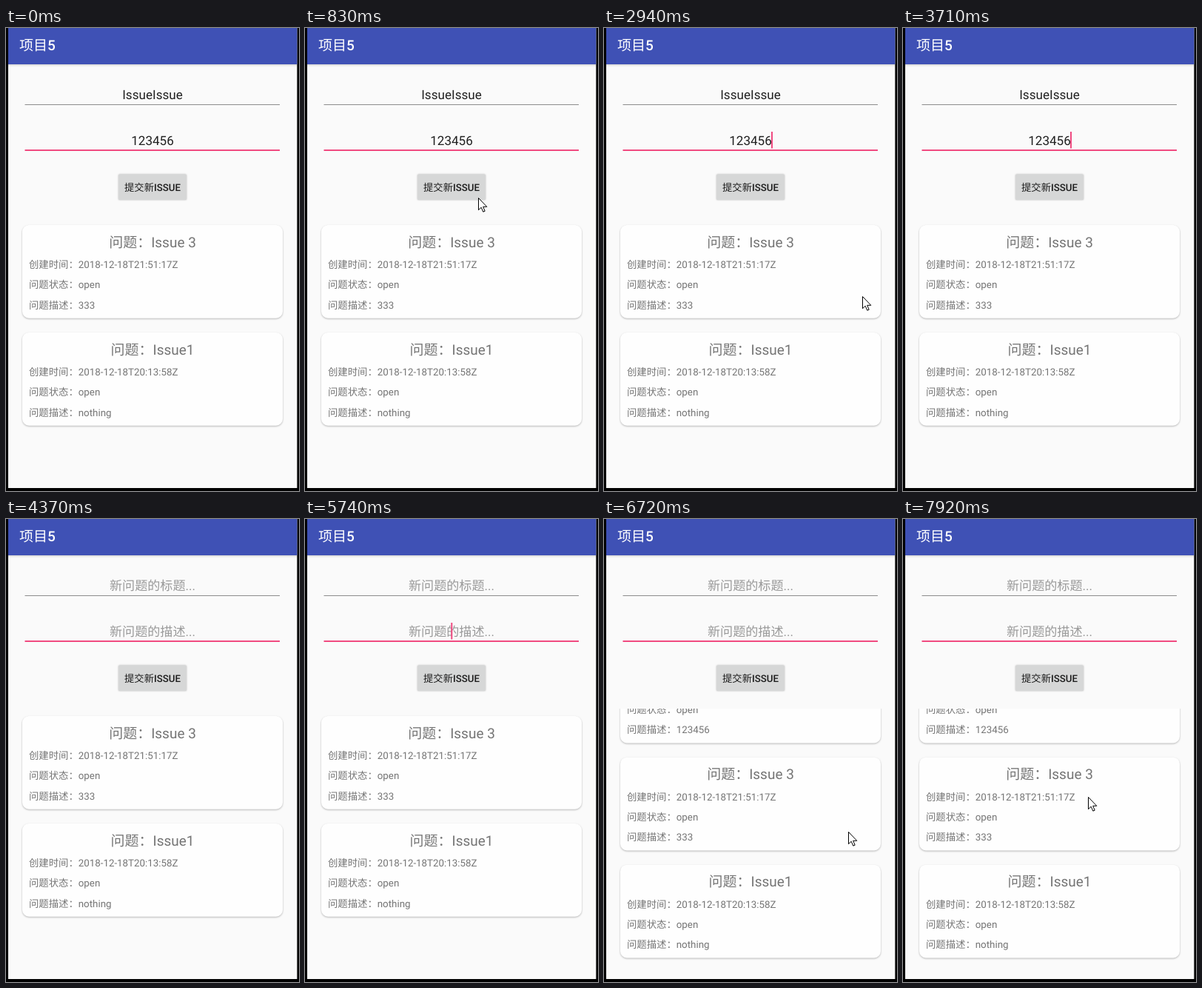
These frames come from a looping animation (396x625 px, 7990 ms). An HTML page:

```html
<!DOCTYPE html>
<html lang="zh-CN">
<head>
<meta charset="utf-8">
<title>项目5</title>
<style>
  html, body { margin: 0; width: 100%; height: 100%; overflow: hidden; background: #000; }
  svg { display: block; }
  text {
    font-family: Roboto, "Noto Sans CJK SC", "Noto Sans CJK", sans-serif;
    text-rendering: geometricPrecision;
  }
  .mid { text-anchor: middle; }
  .medium { font-weight: 500; }
  .field { font-size: 17.1px; fill: #212121; }
  .hint { fill: #999; }
  .accent { fill: #f04a80; }
  .card { fill: #757575; font-size: 13.35px; }
  .card .title { font-size: 19px; }
  .card rect { fill: #fefefe; filter: drop-shadow(0 1px 1.1px rgba(0, 0, 0, .27)); }
  .bar { fill: #3f51b5; filter: drop-shadow(0 1px 1.5px rgba(0, 0, 0, .2)); }
  #button { filter: drop-shadow(0 .5px .8px rgba(0, 0, 0, .25)); }
</style>
</head>
<body>
<svg width="396" height="625" viewBox="0 0 396 625">
  <defs>
    <clipPath id="screen"><rect x="3" width="390.4" height="621"/></clipPath>
    <clipPath id="listArea"><rect x="3" y="256" width="390" height="365"/></clipPath>
  </defs>
  <g clip-path="url(#screen)">
    <rect width="396" height="621" fill="#fafafa"/>
    <rect class="bar" x="-5" y="-5" width="406" height="54"/>
    <text x="18" y="30.3" font-size="19" fill="#fff">项目<tspan class="medium">5</tspan></text>

    <text id="name" class="field mid" x="198" y="96"></text>
    <rect x="25.5" y="103" width="344.5" height="1" fill="#8c8c8c"/>
    <text id="detail" class="field mid" x="198" y="158"></text>
    <rect class="accent" x="25.5" y="164" width="344.5" height="2"/>
    <rect id="caret" class="accent" y="140" width="2" height="22.5"/>

    <rect id="button" x="152" y="197.5" width="92" height="34.5" rx="1.5"/>
    <text class="mid" x="198" y="220" font-size="13.3" fill="#1c1c1c">提交新<tspan class="medium">ISSUE</tspan></text>

    <g clip-path="url(#listArea)">
      <g id="newCard"></g>
      <g id="oldCards"></g>
    </g>
  </g>
  <path id="pointer" d="M.5 .5V16.7L4.2 13.2L6.8 19.2L9.2 18.2L6.7 12.3H11.8Z"
        fill="#fff" stroke="#000"/>
</svg>
<script>
const LOOP = 7990;
const BLINK = 205;
const CARD_TOP = 266;
const CARD_PITCH = 145;
const LIST_SHIFT = 55.7;

// The caret blinks for a while, then stays lit until it is hidden.
const caretBursts = [
  { start: 30, blinks: 10, end: 4370 },
  { start: 4410, blinks: 12, end: 7920 }
];

// Waypoints of each pointer visit; power shapes the approach (below 1 slows down, above 1 speeds up).
const pointerVisits = [
  { end: 3710, path: [
    { at: 130, x: 346, y: 596 },
    { at: 730, x: 245, y: 234, power: .7 },
    { at: 1720, x: 211, y: 217, power: .5 },
    { at: 2080, x: 210, y: 212, power: 1 },
    { at: 2940, x: 348, y: 361, power: 2 },
    { at: 3710, x: 392, y: 405, power: .6 }
  ] },
  { end: LOOP, path: [
    { at: 6320, x: 390, y: 465 },
    { at: 6720, x: 330, y: 422, power: 1 },
    { at: 7120, x: 281, y: 364, power: .8 },
    { at: 7880, x: 250, y: 375, power: 1 }
  ] }
];

const $ = id => document.getElementById(id);
const progress = (t, from, to) => Math.min(1, Math.max(0, (t - from) / (to - from)));
const smooth = p => p * p * (3 - 2 * p);
const mix = (a, b, p) => Math.round(a + (b - a) * p);
const within = (t, from, to) => t >= from && t < to;

function cardMarkup(top, title, created, detail) {
  const lines = ['创建时间：' + created, '问题状态：open', '问题描述：' + detail];
  return `<g class="card" transform="translate(0 ${top})">
    <rect x="22" width="352" height="125.7" rx="9"/>
    <text class="title mid" x="198" y="29.5">问题：${title}</text>
    ${lines.map((line, i) => `<text x="31" y="${58 + i * 27.3}">${line}</text>`).join('')}
  </g>`;
}

$('newCard').innerHTML =
  cardMarkup(CARD_TOP + LIST_SHIFT - CARD_PITCH, 'IssueIssue', '2018-12-18T21:53:40Z', '123456');
$('oldCards').innerHTML =
  cardMarkup(CARD_TOP, 'Issue 3', '2018-12-18T21:51:17Z', '333') +
  cardMarkup(CARD_TOP + CARD_PITCH, 'Issue1', '2018-12-18T20:13:58Z', 'nothing');

function caretVisible(t) {
  const burst = caretBursts.find(({ start, end }) => within(t, start, end));
  if (!burst) return false;
  const flips = Math.floor((t - burst.start) / BLINK);
  return Math.min(flips, burst.blinks) % 2 === 0;
}

function pointerAt(t) {
  const visit = pointerVisits.find(({ path, end }) => within(t, path[0].at, end));
  if (!visit) return null;
  const { path } = visit;
  const next = path.findIndex(point => point.at > t);
  if (next < 0) return path.at(-1);
  const a = path[next - 1];
  const b = path[next];
  const p = progress(t, a.at, b.at) ** b.power;
  return { x: mix(a.x, b.x, p), y: mix(a.y, b.y, p) };
}

function setField(id, value, hint, cleared) {
  const field = $(id);
  field.textContent = cleared ? hint : value;
  field.classList.toggle('hint', cleared);
}

function render(t) {
  const cleared = t >= 4200;
  setField('name', 'IssueIssue', '新问题的标题...', cleared);
  setField('detail', '123456', '新问题的描述...', cleared);

  $('caret').setAttribute('x', cleared ? 197.3 : 226);
  $('caret').setAttribute('visibility', caretVisible(t) ? 'visible' : 'hidden');
  $('button').setAttribute('fill', within(t, 3840, 4370) ? '#c4c5c5' : '#d6d7d7');

  const shift = LIST_SHIFT * smooth(progress(t, 5740, 5870));
  $('oldCards').setAttribute('transform', `translate(0 ${shift})`);
  $('newCard').setAttribute('opacity', progress(t, 5960, 6140));

  const pointer = pointerAt(t);
  $('pointer').setAttribute('visibility', pointer ? 'visible' : 'hidden');
  if (pointer) $('pointer').setAttribute('transform', `translate(${pointer.x} ${pointer.y})`);
}

const begin = performance.now();
function tick() {
  render((performance.now() - begin) % LOOP);
  requestAnimationFrame(tick);
}
tick();
</script>
</body>
</html>
```
